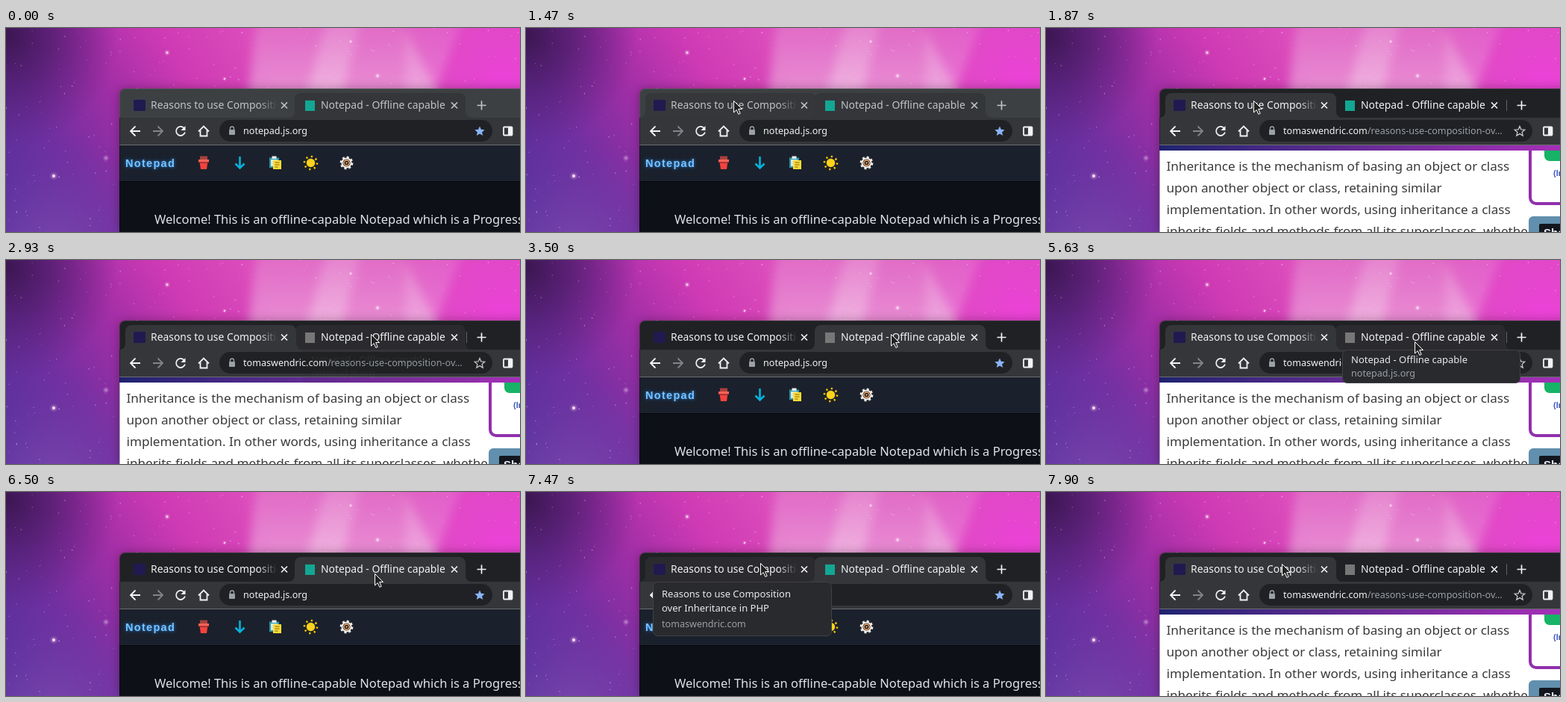
These frames come from a looping animation (689x273 px, 8 s). An HTML page:

```html
<!DOCTYPE html>
<html lang="en">
<head>
<meta charset="utf-8">
<title>Switching tabs</title>
<style>
html, body { margin: 0; width: 100%; height: 100%; overflow: hidden; background: #0d1117; }
svg { display: block; width: 689px; height: 273px; }
text { font-family: "Noto Sans", "Open Sans", sans-serif; white-space: pre; }
.tabs { color: #f1f3f4; font-size: 13.9px; animation: tint 8s step-end infinite; }
.tabs text { fill: currentColor; }
.tabs use, .tabs path { fill: none; stroke: currentColor; stroke-width: 1.7; }
.url { font-size: 12.6px; fill: #f1f3f4; }
.dim { fill: #9aa0a6; }
.body { font: 17.1px "Liberation Sans", Arial, sans-serif; fill: #3a3a3a; }
.icon { fill: none; stroke: #f1f3f4; stroke-width: 1.8; }
.brand {
  font: bold 14.5px "Liberation Sans", Arial, sans-serif; letter-spacing: 1.3px;
  fill: #79c3ff; text-shadow: 0 0 4px #2385e8;
}

.note, .article, .blur, .focus, .fresh, .stale { animation: 8s step-end infinite; }
.note { animation-name: note; }
.article { animation-name: article; }
.blur { animation-name: blur; }
.focus { animation-name: focus; }
.fresh { animation-name: fresh; }
.stale { animation-name: stale; }
.hover1 { animation: hover1 8s linear infinite; }
.hover2 { animation: hover2 8s linear infinite; }
.card1 { animation: card1 8s linear infinite; }
.card2 { animation: card2 8s linear infinite; }
.pointer { animation: pointer 8s ease-in-out infinite; }

@keyframes note {
  0%, 43.7%, 81.2% { opacity: 1; }
  23.32%, 58.32%, 95.82%, 100% { opacity: 0; }
}
@keyframes article {
  0%, 43.7%, 81.2% { opacity: 0; }
  23.32%, 58.32%, 95.82%, 100% { opacity: 1; }
}
@keyframes tint { 0% { color: #c0c3c6; } 22.83%, 100% { color: #f1f3f4; } }
@keyframes blur { 0% { opacity: 1; } 22.83%, 100% { opacity: 0; } }
@keyframes focus { 0% { opacity: 0; } 22.83%, 100% { opacity: 1; } }
/* The icon of the second tab greys out shortly after the tab is left. */
@keyframes fresh {
  0%, 46.2%, 81.2% { opacity: 1; }
  25.83%, 60.83%, 98.4%, 100% { opacity: 0; }
}
@keyframes stale {
  0%, 46.2%, 81.2% { opacity: 0; }
  25.83%, 60.83%, 98.4%, 100% { opacity: 1; }
}
@keyframes hover1 {
  0%, 8% { opacity: 0; }
  10.37%, 22.8% { opacity: .85; }
  22.83%, 52.6% { opacity: 0; }
  54.6%, 58.3% { opacity: .55; }
  58.32%, 88.8% { opacity: 0; }
  90.8%, 95.8% { opacity: .55; }
  95.82%, 100% { opacity: 0; }
}
@keyframes hover2 {
  0%, 33% { opacity: 0; }
  35.5%, 43.68% { opacity: .55; }
  43.7%, 66% { opacity: 0; }
  68%, 81.18% { opacity: .55; }
  81.2%, 100% { opacity: 0; }
}
@keyframes card1 {
  0%, 53.6% { opacity: 0; }
  55.37%, 58.3% { opacity: 1; }
  58.32%, 89.6% { opacity: 0; }
  91.25%, 95.8% { opacity: 1; }
  95.82%, 100% { opacity: 0; }
}
@keyframes card2 {
  0%, 36.5% { opacity: 0; }
  38.7%, 43.68% { opacity: 1; }
  43.7%, 68.5% { opacity: 0; }
  70.37%, 81.18% { opacity: 1; }
  81.2%, 100% { opacity: 0; }
}
@keyframes pointer {
  0%, 3.375% { transform: translate(60px, 276px); animation-timing-function: ease-in; }
  6.4% { transform: translate(160px, 172px); animation-timing-function: ease-out; }
  10.375%, 31.25% { transform: translate(278px, 97px); }
  36%, 51.25% { transform: translate(489px, 99px); }
  54%, 64.625% { transform: translate(242px, 99px); }
  68.5%, 87.5% { transform: translate(494px, 109px); }
  90.5%, 97.6% { transform: translate(314px, 95px); }
  98.6%, 100% { transform: translate(316px, 96px); }
}
</style>
</head>
<body>
<svg viewBox="0 0 689 273">
  <defs>
    <linearGradient id="sky" gradientUnits="userSpaceOnUse" x1="0" y1="230" x2="330" y2="20">
      <stop offset="0" stop-color="#55309a"/>
      <stop offset=".25" stop-color="#7030a0"/>
      <stop offset=".5" stop-color="#a02ea6"/>
      <stop offset=".75" stop-color="#ce3ab4"/>
      <stop offset="1" stop-color="#dc4cbc"/>
    </linearGradient>
    <radialGradient id="plum" gradientUnits="userSpaceOnUse" cx="0" cy="10" r="150">
      <stop offset="0" stop-color="#3b1650"/>
      <stop offset=".4" stop-color="#471a64" stop-opacity=".7"/>
      <stop offset="1" stop-color="#501c70" stop-opacity="0"/>
    </radialGradient>
    <radialGradient id="haze" gradientUnits="userSpaceOnUse" cx="60" cy="300" r="150">
      <stop offset="0" stop-color="#8450b4" stop-opacity=".75"/>
      <stop offset="1" stop-color="#7a3aa8" stop-opacity="0"/>
    </radialGradient>
    <radialGradient id="glow" gradientUnits="userSpaceOnUse" cx="665" cy="70" r="150">
      <stop offset="0" stop-color="#ec42d8"/>
      <stop offset="1" stop-color="#e045cc" stop-opacity="0"/>
    </radialGradient>
    <linearGradient id="beam" x2="0" y2="1">
      <stop offset=".15" stop-color="#f4d8ec" stop-opacity=".22"/>
      <stop offset=".85" stop-color="#f8d8ee" stop-opacity=".45"/>
    </linearGradient>
    <linearGradient id="bar">
      <stop offset="0" stop-color="#1f2370"/>
      <stop offset=".45" stop-color="#5f2b92"/>
      <stop offset="1" stop-color="#a52fb8"/>
    </linearGradient>
    <linearGradient id="fade" gradientUnits="userSpaceOnUse" x1="338" y1="0" x2="364" y2="0">
      <stop offset="0" stop-color="#fff"/>
      <stop offset="1" stop-color="#fff" stop-opacity="0"/>
    </linearGradient>
    <mask id="trim"><rect x="190" y="88" width="175" height="30" fill="url(#fade)"/></mask>
    <filter id="soft" x="-30%" y="-30%" width="160%" height="160%"><feGaussianBlur stdDeviation="7"/></filter>
    <clipPath id="win"><path d="M152 273V89a8 8 0 0 1 8-8H689V273z"/></clipPath>
    <clipPath id="view"><rect x="152" y="164" width="537" height="109"/></clipPath>
    <path id="tab" d="M-8 33a8 8 0 0 0 8-8V8a8 8 0 0 1 8-8H221a8 8 0 0 1 8 8V25a8 8 0 0 0 8 8z"/>
    <path id="cross" d="M-4-4 4 4M4-4-4 4"/>
    <path id="star" d="M0-6.6 1.9-2.2 6.7-1.8 3.1 1.4 4.2 6.1 0 3.6-4.2 6.1-3.1 1.4-6.7-1.8-1.9-2.2z"/>
  </defs>

  <!-- wallpaper -->
  <g>
    <rect width="689" height="273" fill="url(#sky)"/>
    <rect width="689" height="273" fill="url(#plum)"/>
    <rect width="689" height="273" fill="url(#haze)"/>
    <rect width="689" height="273" fill="url(#glow)"/>
  </g>
  <g filter="url(#soft)" fill="url(#beam)">
    <path d="M336-20H525L585 100H324z"/>
    <path d="M432-20H478L448 100H400z"/>
    <path d="M535-20H615L570 100H535z" opacity=".7"/>
  </g>
  <g id="stars" fill="#fbd9f6"></g>
  <path d="M152 273V89a8 8 0 0 1 8-8H700V273z" opacity=".3" filter="url(#soft)"/>

  <g clip-path="url(#win)">
    <!-- tab strip -->
    <rect class="blur" x="152" y="81" width="537" height="40" fill="#3c4043"/>
    <rect class="focus" x="152" y="81" width="537" height="40" fill="#202124"/>
    <path d="M152.5 120V89a7.5 7.5 0 0 1 7.5-7.5H689" fill="none" stroke="#fff" stroke-opacity=".09"/>
    <g fill="#35363a">
      <use class="hover1" href="#tab" x="160" y="87"/>
      <use class="hover2" href="#tab" x="387" y="87"/>
      <use class="article" href="#tab" x="160" y="87"/>
      <use class="note" href="#tab" x="387" y="87"/>
    </g>
    <path class="article" d="M617.5 96v15" stroke="#5f6368"/>
    <rect x="171" y="96" width="16" height="15" rx="1.5" fill="#211a50"/>
    <rect class="fresh" x="401" y="97" width="13" height="14" fill="#13a693"/>
    <rect class="stale" x="401" y="97" width="13" height="14" fill="#777"/>
    <g class="tabs">
      <text x="194" y="108" mask="url(#trim)">Reasons to use Composition</text>
      <text x="422" y="108">Notepad - Offline capable</text>
      <use href="#cross" x="373" y="103.5"/>
      <use href="#cross" x="601" y="103.5"/>
      <path d="M631.5 103.5h12M637.5 97.5v12"/>
    </g>

    <!-- toolbar -->
    <rect x="152" y="120" width="537" height="37" fill="#35363a"/>
    <rect x="286" y="123" width="366" height="29" rx="14.5" fill="#202124"/>
    <g class="icon">
      <path d="M180 138H167.5M173.5 131.5 167 138l6.5 6.5"/>
      <path d="M197 138h12.5M203.5 131.5 210 138l-6.5 6.5" stroke="#808388"/>
      <path d="M238.6 134a6 6 0 1 0 1.3 5.5"/>
      <path d="M240.5 131v6h-6z" fill="#f1f3f4" stroke="none"/>
      <path d="M258 138.5 265 131.5l7 7M260.5 137v7.5h9V137"/>
      <path d="M300.5 136v-1.5a2.5 2.5 0 0 1 5 0V136" stroke="#9aa0a6" stroke-width="1.4"/>
      <rect x="299" y="136" width="8" height="7" rx="1" fill="#9aa0a6" stroke="none"/>
      <rect x="667" y="132.5" width="11.5" height="11" rx="1"/>
      <path d="M673 132h5.5v12H673z" fill="#f1f3f4" stroke="none"/>
    </g>
    <g class="note">
      <text class="url" x="318" y="142">notepad.js.org</text>
      <use href="#star" x="635" y="138" fill="#8ab4f8"/>
    </g>
    <g class="article">
      <text class="url" x="318" y="142">tomaswendric.com<tspan class="dim">/reasons-use-composition-ov…</tspan></text>
      <use href="#star" x="635" y="138" fill="none" stroke="#c4c7cb" stroke-width="1.3"/>
    </g>

    <!-- notepad page -->
    <g class="note">
      <rect x="152" y="157" width="537" height="116" fill="#0d1117"/>
      <rect x="152" y="157" width="537" height="48" fill="#1b212c"/>
      <path d="M152 205.5H689" stroke="#05070a"/>
      <text class="brand" x="160" y="186">Notepad</text>
      <g transform="translate(265 180)">
        <path d="M-5.5-1H5.5L4 9H-4z" fill="#f5423f"/>
        <path d="M-7-4H7V-.5H-7z" fill="#ff6257"/>
        <path d="M-5-8.5H5V-4H-5z" fill="#a8403c"/>
        <path d="M-5.5 0H5.5" stroke="#5a2024"/>
      </g>
      <path d="M313.5 172v15M307.5 181.5l6 6 6-6" fill="none" stroke="#08b1dc" stroke-width="2.6"/>
      <g transform="translate(361 180)">
        <path d="M-8-6.5H5V7H-8z" fill="#2b98a8"/>
        <path d="M-6-4H3V5H-6z" fill="#d8e7e8"/>
        <path d="M-4.5-8.5h6v3.5h-6z" fill="#e8eef0"/>
        <path d="M-3-3H8V9H-3z" fill="#ffdc36"/>
        <path d="M-.5 0H5.5M-.5 3H5.5M-.5 6H3.5" stroke="#7d6518" stroke-width="1.2"/>
      </g>
      <g transform="translate(408.5 180.5)">
        <circle r="8.5" fill="none" stroke="#ffc400" stroke-width="2.6" stroke-dasharray="2.2 4.476"/>
        <circle r="5.7" fill="#ffd21c"/>
      </g>
      <g transform="translate(456.5 180.5)" fill="none">
        <circle r="7.7" stroke="#f4eee8" stroke-width="2.4" stroke-dasharray="3 3.048"/>
        <circle r="6" stroke="#f6f0ea" stroke-width="2"/>
        <circle r="3.6" stroke="#e8a266" stroke-width="1.6"/>
        <circle r="1.2" fill="#e8a266"/>
      </g>
      <text x="199" y="262" font-size="16.5" fill="#dfe3e8">Welcome! This is an offline-capable Notepad which is a Progressive</text>
    </g>

    <!-- article page -->
    <g class="article">
      <rect x="152" y="157" width="537" height="7" fill="url(#bar)"/>
      <g clip-path="url(#view)">
        <rect x="152" y="164" width="537" height="109" fill="#fff"/>
        <g class="body">
          <text x="161.5" y="191">Inheritance is the mechanism of basing an object or class</text>
          <text x="161.5" y="220">upon another object or class, retaining similar</text>
          <text x="161.5" y="249">implementation. In other words, using inheritance a class</text>
          <text x="161.5" y="278">inherits fields and methods from all its superclasses, whether</text>
        </g>
        <rect x="649" y="120" width="80" height="115" rx="8" fill="#fff" stroke="#9130ab" stroke-width="4"/>
        <rect x="668" y="140" width="40" height="38" rx="7" fill="#17b366"/>
        <text x="680" y="198" style="font:bold 11px 'Liberation Sans',sans-serif" fill="#3f58bd">(In</text>
        <rect x="647" y="252" width="60" height="40" rx="6" fill="#628fad"/>
        <rect x="661" y="262" width="50" height="30" rx="2" fill="#12161f"/>
        <text x="667" y="279" style="font:bold 15px 'Liberation Sans',sans-serif" fill="#eee">Sho</text>
      </g>
    </g>
    <path d="M152 156.5H689" stroke="#6b6d70"/>
    <path d="M152.5 120V273" stroke="#000" stroke-opacity=".3"/>

    <!-- hover cards -->
    <g class="card1">
      <rect x="170.5" y="120.5" width="239" height="72" rx="6" fill="#292a2d" stroke="#3f4145"/>
      <text x="182" y="141" font-size="13" fill="#e8eaed">Reasons to use Composition<tspan x="182" dy="19">over Inheritance in PHP</tspan></text>
      <text class="dim" x="182" y="181" font-size="12.6">tomaswendric.com</text>
    </g>
    <g class="card2">
      <rect x="397.5" y="120.5" width="238" height="44" rx="6" fill="#292a2d" stroke="#3f4145"/>
      <text x="409" y="138" font-size="13" fill="#e8eaed">Notepad - Offline capable</text>
      <text class="dim" x="409" y="156" font-size="12.6">notepad.js.org</text>
    </g>
  </g>

  <path class="pointer" d="M.5.5V16l3.7-3.4 2.6 5.8 2.4-1L6.700 11.500H11.500z" fill="#222" stroke="#fff"/>
</svg>
<script>
const sky = document.getElementById("stars");
let seed = 41;
const rand = () => (seed = seed * 16807 % 2147483647) / 2147483647;

function star(x, y, r, opacity) {
  const dot = document.createElementNS("http://www.w3.org/2000/svg", "circle");
  Object.entries({ cx: x, cy: y, r, opacity }).forEach(([k, v]) => dot.setAttribute(k, v));
  sky.append(dot);
}

for (let i = 0; i < 320; i++) {
  star(rand() * 689, rand() * 273, .4 + rand() * .5, .2 + rand() * .5);
}
for (const [x, y, r] of [[216, 33, 1.7], [64, 198, 2.2], [498, 64, 1.8], [462, 18, 1.2], [293, 68, 1.2], [134, 174, 1.7]]) {
  star(x, y, r * 2.2, .18);
  star(x, y, r, x === 134 ? .4 : .95);
}
</script>
</body>
</html>
```
